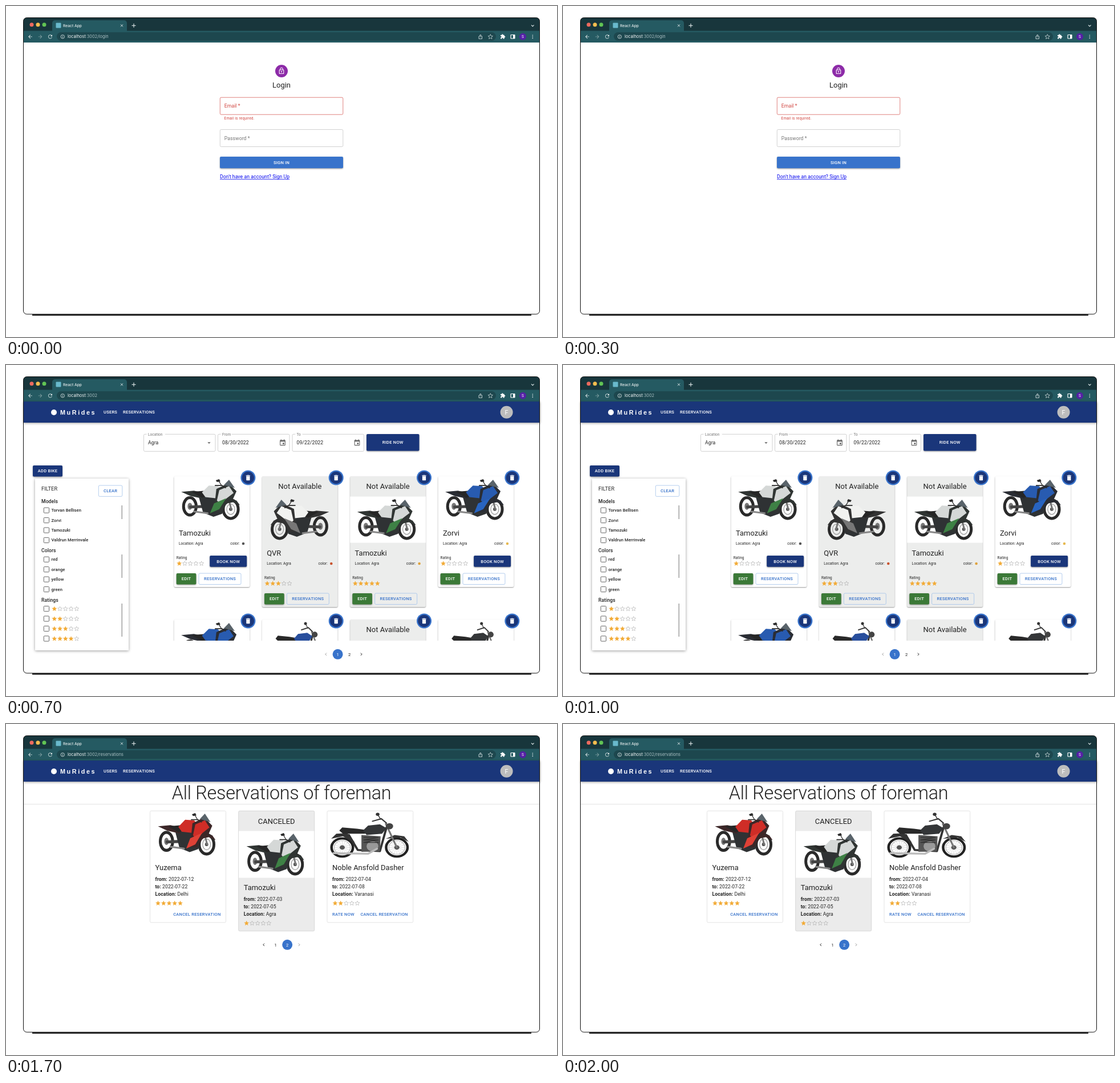
Animation of 966x580 px, one loop 2.2 s. Source, as an HTML page with a canvas:

```html
<!DOCTYPE html>
<html lang="en">
<head>
<meta charset="utf-8">
<title>Bike rental tour</title>
<style>
html, body { margin: 0; width: 100%; height: 100%; overflow: hidden; background: #fff; }
canvas { display: block; }
</style>
</head>
<body>
<canvas id="stage" width="966" height="580"></canvas>
<script>
const ctx = document.getElementById('stage').getContext('2d');
const NAVY = '#1a367a', BLUE = '#3873cb', RED = '#d0443f', INK = '#222', GREY = '#757575', GOLD = '#f2ab37';
const ROBOTO = 'Roboto, sans-serif', UI = 'Inter, sans-serif', ARIAL = '"Liberation Sans", sans-serif';
// Type sizes of the page, which is shown at 54 %
const BODY = 8.64, SMALL = 7.56, CAPTION = 6.48, HEADING = 12.96, TITLE = 32.4;

const ICONS = {
  lock: 'M12 17c1.1 0 2-.9 2-2s-.9-2-2-2-2 .9-2 2 .9 2 2 2zm6-9h-1V6c0-2.76-2.24-5-5-5S7 3.24 7 6v2H6c-1.1 0-2 .9-2 2v10c0 1.1.9 2 2 2h12c1.1 0 2-.9 2-2V10c0-1.1-.9-2-2-2zM8.9 6c0-1.71 1.39-3.1 3.1-3.1s3.1 1.39 3.1 3.1v2H8.9V6zM18 20H6V10h12v10z',
  calendar: 'M17 12h-5v5h5v-5zM16 1v2H8V1H6v2H5c-1.11 0-2 .9-2 2v14c0 1.1.89 2 2 2h14c1.1 0 2-.9 2-2V5c0-1.1-.9-2-2-2h-1V1h-2zm3 18H5V8h14v11z',
  trash: 'M6 19c0 1.1.9 2 2 2h8c1.1 0 2-.9 2-2V7H6v12zM19 4h-3.5l-1-1h-5l-1 1H5v2h14V4z',
  star: 'M12 17.27L18.18 21l-1.64-7.03L22 9.24l-7.19-.61L12 2 9.19 8.63 2 9.24l5.46 4.73L5.82 21z',
  drop: 'M7 10l5 5 5-5z',
  check: 'M12 2C6.48 2 2 6.48 2 12s4.48 10 10 10 10-4.48 10-10S17.52 2 12 2zm-2 15l-5-5 1.41-1.41L10 14.17l7.59-7.59L19 8l-9 9z',
  puzzle: 'M20.5 11H19V7c0-1.1-.9-2-2-2h-4V3.5a2.5 2.5 0 0 0-5 0V5H4c-1.1 0-2 .9-2 2v3.8h1.5a2.7 2.7 0 0 1 0 5.4H2V20c0 1.1.9 2 2 2h3.8v-1.5a2.7 2.7 0 0 1 5.4 0V22H17c1.1 0 2-.9 2-2v-4h1.5a2.5 2.5 0 0 0 0-5z',
  reload: 'M17.65 6.35A8 8 0 1 0 19.73 14h-2.08A6 6 0 1 1 16.22 7.78L13 11h7V4z',
  back: 'M20 11H7.83l5.59-5.59L12 4l-8 8 8 8 1.41-1.41L7.83 13H20z',
  forward: 'M4 11h12.17l-5.59-5.59L12 4l8 8-8 8-1.41-1.41L16.17 13H4z'
};
for (const name in ICONS) ICONS[name] = new Path2D(ICONS[name]);

function text(str, x, y, size, color = INK, { weight = 400, align = 'left', font = ROBOTO, spacing = 0.009 * size } = {}) {
  ctx.font = `${weight} ${size}px ${font}`;
  ctx.letterSpacing = spacing + 'px';
  ctx.textAlign = align;
  ctx.fillStyle = color;
  ctx.fillText(str, x, y);
  return ctx.measureText(str).width;
}

function centered(str, x, y, size, color, options) {
  text(str, x, y, size, color, { align: 'center', ...options });
}

function labelled(label, value, x, y) {
  const width = text(label + ' ', x, y, BODY, INK, { weight: 700 });
  text(value, x + width, y, BODY);
}

function box(x, y, w, h, { fill, stroke, radius = 2, line = 0.8, shadow } = {}) {
  ctx.beginPath();
  ctx.roundRect(x, y, w, h, radius);
  if (fill) {
    ctx.save();
    if (shadow) {
      ctx.shadowColor = 'rgba(0,0,0,.4)';
      ctx.shadowBlur = shadow;
      ctx.shadowOffsetY = 1;
    }
    ctx.fillStyle = fill;
    ctx.fill();
    ctx.restore();
  }
  if (stroke) {
    ctx.strokeStyle = stroke;
    ctx.lineWidth = line;
    ctx.stroke();
  }
}

function disc(x, y, r, fill, ry = r) {
  ctx.beginPath();
  ctx.ellipse(x, y, r, ry, 0, 0, 7);
  ctx.fillStyle = fill;
  ctx.fill();
}

function ring(x, y, r, color, width, ry = r) {
  ctx.beginPath();
  ctx.ellipse(x, y, r, ry, 0, 0, 7);
  ctx.strokeStyle = color;
  ctx.lineWidth = width;
  ctx.stroke();
}

function trace(points) {
  ctx.beginPath();
  for (let i = 0; i < points.length; i += 2) ctx.lineTo(points[i], points[i + 1]);
}

function line(color, width, ...points) {
  trace(points);
  ctx.strokeStyle = color;
  ctx.lineWidth = width;
  ctx.stroke();
}

function shape(color, ...points) {
  trace(points);
  ctx.fillStyle = color;
  ctx.fill();
}

function icon(name, x, y, size, color, outline) {
  ctx.save();
  ctx.translate(x - size / 2, y - size / 2);
  ctx.scale(size / 24, size / 24);
  if (outline) {
    ctx.strokeStyle = color;
    ctx.lineWidth = 1.6;
    ctx.stroke(ICONS[name]);
  } else {
    ctx.fillStyle = color;
    ctx.fill(ICONS[name]);
  }
  ctx.restore();
}

function cross(x, y, r, color) {
  line(color, 0.9, x - r, y - r, x + r, y + r);
  line(color, 0.9, x - r, y + r, x + r, y - r);
}

function button(label, x, y, w, h, fill = NAVY, size = SMALL) {
  const outlined = fill === 'outline';
  box(x, y, w, h, outlined ? { stroke: '#a3c2ea' } : { fill, shadow: 2.5 });
  centered(label, x + w / 2, y + h / 2 + size * 0.36, size, outlined ? BLUE : '#fff', { weight: 500, spacing: size * 0.0286 });
}

function stars(count, x, y) {
  for (let i = 0; i < 5; i++) {
    const filled = i < count;
    icon('star', x + i * 9.75, y, filled ? 10.6 : 9.4, filled ? GOLD : '#aaa', !filled);
  }
}

function pager(x, y, pages, active) {
  const arrow = (ax, dir, on) => line(on ? INK : '#999', 1, ax - dir, y - 2.2, ax + dir * 1.2, y, ax - dir, y + 2.2);
  arrow(x, -1, active > 1);
  for (let page = 1; page <= pages; page++) {
    const px = x + 20.6 * page;
    if (page === active) disc(px, y, 9, BLUE);
    centered(String(page), px, y + 2.7, SMALL, page === active ? '#fff' : INK);
  }
  arrow(x + 20.6 * (pages + 1), 1, active < pages);
}

// A motorbike facing right in a box of 108 by 73 units
function bike(x, y, w, h, { body, trim = '#333', accent = body, classic, flip }) {
  ctx.save();
  ctx.translate(flip ? x + w : x, y);
  ctx.scale((flip ? -w : w) / 108, h / 73);
  ctx.lineJoin = ctx.lineCap = 'round';
  if (classic) {
    for (const wheel of [17, 91]) {
      ring(wheel, 56, 14.5, '#222', 3.5);
      ring(wheel, 56, 11, '#aaa', 0.8);
      for (let a = 0; a < Math.PI; a += Math.PI / 8) {
        const dx = 11 * Math.cos(a), dy = 11 * Math.sin(a);
        line('#bbb', 0.4, wheel - dx, 56 - dy, wheel + dx, 56 + dy);
      }
      disc(wheel, 56, 3.5, '#555');
    }
    line('#333', 3, 26, 36, 38, 60, 68, 62, 77, 24);
    shape('#555', 43, 36, 69, 38, 68, 62, 43, 63);
    disc(58, 54, 8, '#999');
    line('#333', 1.2, 46, 40, 66, 40, 46, 44, 66, 44, 46, 48, 66, 48);
    line('#bbb', 3, 64, 58, 52, 66, 5, 65);
    shape(trim, 2, 42, 9, 34, 24, 33, 34, 48, 28, 45, 18, 38);
    shape(trim, 76, 42, 88, 36, 101, 38, 107, 47, 96, 40, 86, 41);
    shape('#292929', 13, 29, 17, 24, 37, 26, 50, 28, 48, 34, 18, 34);
    shape(body, 45, 29, 52, 21, 68, 19, 77, 25, 71, 34, 50, 36);
    line('#777', 2.5, 76, 18, 91, 56);
    disc(81, 22, 5, '#444');
    line('#333', 1.8, 58, 14, 70, 10, 77, 17);
    line('#333', 1.2, 69, 11, 65, 3);
    disc(65, 3, 2.5, '#333');
  } else {
    ring(17, 48, 11, '#2a2a2a', 5, 15);
    disc(17, 48, 4, '#777', 6);
    ring(88, 53, 13, '#2a2a2a', 5, 16);
    ring(88, 53, 7, '#999', 1.2, 9);
    disc(88, 53, 3, '#555');
    line('#444', 5, 18, 49, 45, 48);
    shape('#2f3234', 32, 30, 80, 34, 73, 61, 58, 66, 40, 59);
    line('#888', 3, 48, 60, 24, 57);
    line('#777', 3, 80, 20, 89, 53);
    shape(trim, 2, 23, 24, 21, 46, 26, 41, 35, 18, 30);
    shape('#262626', 20, 23, 44, 21, 51, 29, 38, 33);
    shape(body, 38, 24, 50, 12, 66, 13, 75, 24, 62, 34, 44, 32);
    shape(trim, 63, 18, 84, 8, 98, 22, 92, 35, 80, 45, 71, 58, 58, 57, 61, 36);
    shape(body, 68, 20, 85, 13, 93, 25, 81, 34, 70, 44, 64, 38);
    shape(accent, 59, 43, 80, 34, 68, 53, 52, 60);
    shape(trim, 76, 44, 86, 36, 98, 38, 104, 46, 92, 41);
    shape('#59636a', 76, 11, 85, 2, 95, 16);
    line('#2a2a2a', 1.6, 61, 12, 73, 12, 79, 16);
    line('#2a2a2a', 1.2, 72, 12, 67, 4);
    shape('#2a2a2a', 62, 3, 68, 1, 70, 5, 64, 6);
  }
  ctx.restore();
}

const SPORT = { body: '#d5d8d7', trim: '#303533', accent: '#3e8145' };
const NAKED = { body: '#285bb0', trim: '#2a2d34', accent: '#2864c0' };
const WHITE = { body: '#f1f2f0', trim: '#333', accent: '#777', flip: true };
const FIERY = { body: '#cf2d27', trim: '#3c2728', accent: '#df4136' };
const CRUISER = { body: '#284e9c', trim: '#333', classic: true };
const BLACK = { body: '#343638', trim: '#333', classic: true };

function browser(path) {
  ctx.fillStyle = '#fff';
  ctx.fillRect(0, 0, 966, 580);
  line('#000', 2.2, 46, 541.3, 921, 541.3);
  box(30.5, 20.5, 905, 519.5, { fill: '#fff', radius: 6 });
  box(30.5, 20.5, 905, 43, { fill: '#18363c', radius: [6, 6, 0, 0] });
  ctx.fillStyle = '#255a62';
  ctx.fillRect(31, 43.5, 904.5, 20.5);
  box(81, 25, 131, 20, { fill: '#255a62', radius: [5, 5, 0, 0] });
  box(89, 46, 770, 15, { fill: '#1d474e', radius: 7.5 });
  ['#ee6a5f', '#f5bd4f', '#61c454'].forEach((color, i) => disc(45 + i * 11, 32.7, 3.5, color));
  box(87.5, 29.5, 9, 9, { fill: '#69b9cc', radius: 1 });
  text('React App', 100, 36.8, 6.7, '#e8eeee', { weight: 500, font: UI, spacing: 0 });
  const pale = '#e3ebec';
  cross(203, 34.3, 2, pale);
  line(pale, 1.1, 220.5, 34.3, 227.5, 34.3);
  line(pale, 1.1, 224, 30.8, 224, 37.8);
  line(pale, 1.1, 921, 33.3, 923.3, 35.6, 925.6, 33.3);

  icon('back', 42.5, 53.8, 10, pale);
  icon('forward', 60, 53.8, 10, '#82a1a5');
  icon('reload', 77.5, 53.8, 10.5, pale);
  ring(99.3, 53.8, 3.2, pale, 0.8);
  line(pale, 0.9, 99.3, 53.4, 99.3, 55.6);
  line(pale, 0.9, 99.3, 51.8, 99.3, 52.6);
  const host = text('localhost', 108, 56.3, 7.4, '#f3f7f7', { font: UI, spacing: 0 });
  text(':3002' + path, 108 + host, 56.3, 7.4, '#a9bfc2', { font: UI, spacing: 0 });
  line(pale, 0.8, 830.5, 53, 829, 53, 829, 57.5, 834.5, 57.5, 834.5, 53, 833, 53);
  line(pale, 0.8, 831.8, 55, 831.8, 50.5);
  line(pale, 0.8, 830, 52, 831.8, 50.2, 833.6, 52);
  icon('star', 849.3, 53.8, 10, pale, true);
  icon('puzzle', 871, 53.5, 9.5, '#fff');
  box(885, 50.5, 7, 6.5, { stroke: '#fff', radius: 0.5, line: 1.2 });
  ctx.fillStyle = '#fff';
  ctx.fillRect(889, 50.5, 3, 6.5);
  disc(906, 53.8, 6, '#5420a5');
  centered('S', 906, 56.2, 6.5, '#fff');
  for (const dy of [-2.6, 0, 2.6]) disc(923.3, 53.8 + dy, 0.8, pale);
}

function appBar() {
  box(31, 64, 904.5, 37, { fill: NAVY, radius: 0, shadow: 4 });
  disc(84, 83, 5, '#fff');
  text('MuRides', 95, 86.8, 10.8, '#fff', { weight: 700, font: ARIAL, spacing: 2.6 });
  const menu = { weight: 500, spacing: 0.216 };
  text('USERS', 171, 85.4, SMALL, '#fff', menu);
  text('RESERVATIONS', 205, 85.4, SMALL, '#fff', menu);
  disc(877.6, 82.8, 11, '#bdbdbd');
  centered('F', 877.6, 86.6, 10.8, '#fff');
}

function field(label, x, y, w, { value, color = GREY, border = '#c6c6c6', symbol } = {}) {
  box(x, y, w, 30, { stroke: border });
  if (value) {
    ctx.fillStyle = '#fff';
    ctx.fillRect(x + 5, y - 1, label.length * 3.3 + 6, 2);
    text(label, x + 7.5, y + 2.2, CAPTION, color);
    text(value, x + 7.5, y + 18.1, BODY);
  } else {
    text(label, x + 7.5, y + 18, BODY, color);
  }
  if (symbol) icon(symbol, x + w - (symbol === 'drop' ? 11 : 12), y + 15, 13, '#666');
}

function searchBar(place, from, to) {
  appBar();
  field('Location', 241.5, 121.3, 125.5, { value: place, symbol: 'drop' });
  field('From', 371.5, 121.3, 125.5, { value: from, symbol: 'calendar' });
  const invalid = to ? {} : { color: RED, border: '#d9625d' };
  field('To', 502, 121.3, 125.5, { value: to, symbol: 'calendar', ...invalid });
  button('RIDE NOW', 632, 121, 92.5, 29.5);
  button('ADD BIKE', 47, 176, 52, 19.5);
}

function login() {
  browser('/login');
  disc(483, 114, 11, '#8d2ba8');
  icon('lock', 483, 113.7, 13, '#fff');
  centered('Login', 483, 142.8, HEADING, INK, { spacing: 0 });
  field('Email *', 375.3, 160.2, 215.5, { color: RED, border: '#d9625d' });
  text('Email is required.', 382.5, 199.4, CAPTION, RED, { spacing: 0.2 });
  field('Password *', 375.3, 216.5, 215.5);
  button('SIGN IN', 375, 264, 216, 20.3, BLUE);
  const width = text("Don't have an account? Sign Up", 375, 302.3, BODY, '#0000ee');
  line('#0000ee', 0.8, 375, 303.7, 375 + width, 303.7);
}

function welcome() {
  browser('');
  searchBar();
  box(754.5, 485, 171, 35, { fill: '#fff', shadow: 5 });
  icon('check', 767.5, 502.8, 13, '#4fb532');
  text('welcome foreman@b.example', 778.5, 505.8, BODY, GREY, { font: ARIAL });
  cross(916, 494, 2.3, '#888');
  ctx.fillStyle = '#4fb532';
  ctx.fillRect(754.5, 517.5, 25.5, 2.6);
}

function filterPanel() {
  box(51, 199, 164, 301, { fill: '#fff', shadow: 5, radius: 1 });
  text('FILTER', 62, 220.4, 9.2);
  button('CLEAR', 162.3, 211, 41.5, 19.3, 'outline');
  const groups = [
    ['Models', 242.2, ['Torvan Bellisen', 'Zorvi', 'Tamozuki', 'Valdrun Merrinvale'], 246, 270],
    ['Colors', 328.3, ['red', 'orange', 'yellow', 'green'], 332, 373],
    ['Ratings', 414.7, [1, 2, 3, 4], 418, 476]
  ];
  for (const [title, y, rows, top, bottom] of groups) {
    text(title, 62, y, BODY, INK, { weight: 500 });
    rows.forEach((row, i) => {
      const cy = y + 12.4 + i * 17.45;
      box(66.3, cy - 4.6, 9.2, 9.2, { stroke: '#666', radius: 1, line: 1 });
      if (typeof row === 'number') stars(row, 84.8, cy);
      else text(row, 79.5, cy + 2.5, SMALL, INK, { weight: 500 });
    });
    line('#999', 1.4, 203.3, top, 203.3, bottom);
  }
}

function bikeCard(column, y, { name, style, rating, dot, available, photo }) {
  const x = 294.7 + column * 154.3, shift = available ? 0 : 35;
  box(x, y, 132.5, 194 + shift, { fill: available ? '#fff' : '#ecedec', shadow: 2 });
  if (!available) centered('Not Available', x + 66.3, y + 22, HEADING, INK, { spacing: 0 });
  if (photo) {
    ctx.fillStyle = '#fff';
    ctx.fillRect(x, y + 35.5, 132.5, 81);
  }
  bike(x + 10.5, y + 4 + shift, 109, 74, style);
  text(name, x + 8.3, y + 103.7 + shift, HEADING, INK, { spacing: 0 });
  text('Location: Agra', x + 8.3, y + 120.2 + shift, CAPTION);
  text('color:', x + 98.5, y + 120.2 + shift, CAPTION);
  disc(x + 121.3, y + 118 + shift, 2.3, dot);
  text('Rating', x + 4, y + 144.7 + shift, CAPTION);
  stars(rating, x + 9, y + 152.7 + shift);
  if (available) button('BOOK NOW', x + 62.5, y + 139, 65, 19.7);
  button('EDIT', x + 4, y + 170 + shift, 34.7, 19.5, '#3b7937');
  button('RESERVATIONS', x + 43.3, y + 170 + shift, 74, 19.5, 'outline');
  disc(x + 129.7, y + 2.5, 13, BLUE);
  disc(x + 129.7, y + 2.5, 10.7, NAVY);
  icon('trash', x + 129.7, y + 2.5, 12.5, '#fff');
}

function catalogue() {
  browser('');
  searchBar('Agra', '08/30/2022', '09/22/2022');
  filterPanel();
  ctx.save();
  ctx.beginPath();
  ctx.rect(260, 180, 660, 303);
  ctx.clip();
  const first = [
    { name: 'Tamozuki', style: SPORT, rating: 1, dot: '#555', available: true },
    { name: 'QVR', style: WHITE, rating: 3, dot: '#c9532f' },
    { name: 'Tamozuki', style: SPORT, rating: 5, dot: '#dfa23c', photo: true },
    { name: 'Zorvi', style: NAKED, rating: 1, dot: '#e6b84f', available: true }
  ];
  const second = [NAKED, CRUISER, SPORT, BLACK];
  first.forEach((card, i) => bikeCard(i, 195, card));
  second.forEach((style, i) => bikeCard(i, 446, { name: '', style, rating: 0, dot: '#555', available: i !== 2 }));
  ctx.restore();
  pager(561, 506.8, 2, 1);
}

function heading(title) {
  appBar();
  centered(title, 483, 132, TITLE, INK, { weight: 300, spacing: -0.27 });
  line('#dedede', 0.8, 31, 140.5, 935, 140.5);
}

function userCard(x, y, w, name, email, role) {
  const color = role === 'Manager' ? '#e24b60' : NAVY;
  box(x, y, w, 74, { stroke: color, line: 0.8 });
  box(x, y, 55, 74, { fill: color, radius: [2, 0, 0, 2] });
  centered(name, x + 27.7, y + 40.6, 10.8, '#fff');
  labelled('Email:', email, x + 63.7, y + 18.4);
  labelled('Role:', role, x + 63.7, y + 31.6);
  button('RESERVATION', x + 64, y + 51, 58.5, 16, 'outline', 7.02);
  button('EDIT', x + w - 51.5, y + 50.7, 35, 16.5, NAVY, 7.02);
}

function users() {
  browser('/users');
  heading('All Users');
  button('ADD USER', 451, 146, 64, 22.5);
  userCard(167, 184, 184, 'foreman', 'foreman@b.example', 'Manager');
  const places = [[373, 184], [577, 184], [167, 280.5], [371, 280.5]];
  places.forEach(([x, y], i) => userCard(x, y, 181.8, `partner${i + 1}`, `partner${i + 1}@b.example`, 'Regular'));
  userCard(574.5, 280.5, 178.7, 'qwk', 'qwk@example', 'Manager');
  pager(462.4, 374.6, 1, 1);
}

function reservationCard(x, w, name, style, from, to, place, rating, { canceled, rate } = {}) {
  const shift = canceled ? 35 : 0, y = 152.3;
  box(x, y, w, canceled ? 210.5 : 195.5, { fill: canceled ? '#ebebeb' : '#fff', stroke: canceled ? '#d0d0d0' : '#ddd' });
  if (canceled) {
    centered('CANCELED', x + w / 2, 174.5, HEADING, INK, { spacing: 0 });
    ctx.fillStyle = '#fff';
    ctx.fillRect(x + 0.5, 187.5, w - 1, 82);
  }
  const margin = style.classic ? 4.5 : 12;
  bike(x + margin, 155 + shift, w - 2 * margin - 2, style.classic ? 80 : 77, style);
  text(name, x + 9, 256 + shift, HEADING, INK, { spacing: 0 });
  labelled('from:', from, x + 9, 274.8 + shift);
  labelled('to:', to, x + 9, 288 + shift);
  labelled('Location:', place, x + 9, 301.2 + shift);
  stars(rating, x + 14, 314 + shift);
  const action = { weight: 500, spacing: 0.216 };
  if (!canceled) text('CANCEL RESERVATION', x + w - 9, 335.8, SMALL, BLUE, { align: 'right', ...action });
  if (rate) text('RATE NOW', x + 9, 335.8, SMALL, BLUE, action);
}

function reservations() {
  browser('/reservations');
  heading('All Reservations of foreman');
  reservationCard(252.5, 133, 'Yuzema', FIERY, '2022-07-12', '2022-07-22', 'Delhi', 5);
  reservationCard(407.7, 133, 'Tamozuki', SPORT, '2022-07-03', '2022-07-05', 'Agra', 1, { canceled: true });
  reservationCard(563, 150.7, 'Noble Ansfold Dasher', BLACK, '2022-07-04', '2022-07-08', 'Varanasi', 2, { rate: true });
  pager(452, 386.8, 2, 2);
}

const LOOP = 2200;
const SCENES = [[500, login], [700, welcome], [1200, catalogue], [1700, users], [LOOP, reservations]];

function render(now) {
  const time = now % LOOP;
  const [, draw] = SCENES.find(([end]) => time < end);
  draw();
  box(30.5, 20.5, 905, 519.5, { stroke: '#111', radius: 6, line: 1 });
  requestAnimationFrame(render);
}
requestAnimationFrame(render);
</script>
</body>
</html>
```
